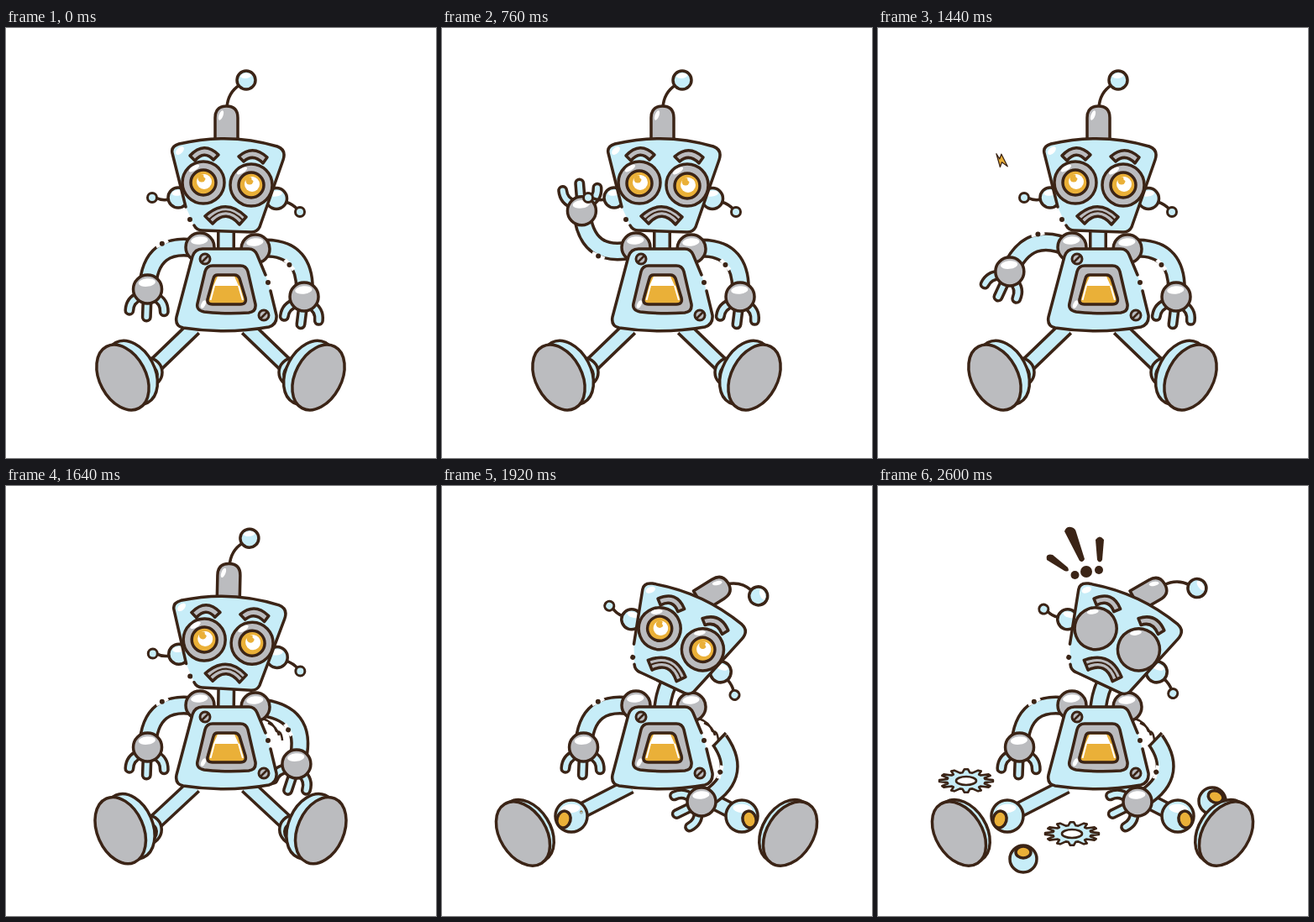
An HTML page that plays this animation: 512x512 px, repeating every 2.88 s.

```html
<!DOCTYPE html>
<html lang="en">
<head>
<meta charset="utf-8">
<title>Robot breakdown</title>
<style>
  html, body { margin: 0; width: 100%; height: 100%; overflow: hidden; background: #fff; }
  svg { display: block; width: 100vw; height: 100vh; }
</style>
</head>
<body>
<svg id="stage" viewBox="0 0 512 512" stroke="#3b2416" stroke-width="3.5" stroke-linejoin="round"></svg>
<script>
const LOOP = 2880, STEP = 40;
const INK = '#3b2416', BLUE = '#c7edf8', GRAY = '#bbbcbf', GOLD = '#eab038', WHITE = '#fff';

// Timing helpers
const clamp = v => Math.min(1, Math.max(0, v));
const lerp = (a, b, u) => a + (b - a) * u;
const ramp = (t, a, b) => clamp((t - a) / (b - a));
const smooth = (t, a, b) => { const u = ramp(t, a, b); return u * u * (3 - 2 * u); };
const track = (t, ...keys) => keys.reduce((v, [time, value], i) =>
  i ? lerp(v, value, smooth(t, keys[i - 1][0], time)) : value, 0);

// Drawing helpers
const path = (d, fill = 'none', more = '') => `<path d="${d}" fill="${fill}" ${more}/>`;
const circle = (x, y, r, fill, more = '') => `<circle cx="${x}" cy="${y}" r="${r}" fill="${fill}" ${more}/>`;
const ellipse = (x, y, rx, ry, fill, turn = 0, more = '') =>
  `<ellipse rx="${rx}" ry="${ry}" fill="${fill}" transform="translate(${x} ${y}) rotate(${turn})" ${more}/>`;
const group = (transform, ...parts) => `<g transform="${transform}">${parts.join('')}</g>`;
const bare = 'stroke="none"';
const dot = (x, y) => circle(x, y, 3, INK, bare);
const glint = (x, y, rx, ry, turn) => ellipse(x, y, rx, ry, WHITE, turn, bare);
const ball = (x, y, r, fill) => circle(x, y, r, fill) + glint(x - r * .04, y - r * .47, r * .6, r * .28, -6);
const tube = (d, w, cap = 'butt') =>
  path(d, 'none', `stroke-width="${w}" stroke-linecap="${cap}"`) +
  path(d, 'none', `stroke="${BLUE}" stroke-width="${w - 7}" stroke-linecap="${cap}"`);

function arm([sx, sy], [cx, cy], [hx, hy], s, side) {
  const r = 1 - s;
  const x = r * r * sx + 2 * r * s * cx + s * s * hx;
  const y = r * r * sy + 2 * r * s * cy + s * s * hy;
  const dx = r * (cx - sx) + s * (hx - cx), dy = r * (cy - sy) + s * (hy - cy);
  const len = Math.hypot(dx, dy) || 1, tx = dx / len, ty = dy / len;
  const ex = x - ty * 10 * side, ey = y + tx * 10 * side;
  return tube(`M${sx} ${sy}Q${cx} ${cy} ${hx} ${hy}`, 23) +
    path(`M${ex - tx * 8} ${ey - ty * 8}L${ex + tx * 8} ${ey + ty * 8}`, 'none', `stroke="${WHITE}" stroke-width="4.5"`) +
    dot(ex, ey);
}

function hand(x, y, turn, dir) {
  const fingers = [-45, 0, 45].map(a =>
    group(`rotate(${dir + a})`, tube(`M12 0Q24 ${a / 9} 33 ${-a / 12}`, 13, 'round')));
  return group(`translate(${x} ${y}) rotate(${turn})`, ...fingers) + ball(x, y, 17, GRAY);
}

function leftArm(t) {
  const angle = track(t, [240, 142], [680, 219], [900, 207], [1130, 219], [1580, 142]);
  const rad = angle * Math.PI / 180, c = Math.cos(rad), s = Math.sin(rad);
  const bend = Math.tanh((173 - angle) / 9);
  const x = 230 + 78 * c, y = 263 + 78 * s;
  const elbow = [230 + 39 * c - s * 46 * bend, 263 + 39 * s + c * 46 * bend];
  return arm([230, 263], elbow, [x, y], .42, bend < 0 ? -1 : 1) + hand(x, y, 0, angle - 50 * bend);
}

function rightArm(t) {
  const fall = ramp(t, 1560, 1740) ** 2;
  const x = lerp(355, 309, fall), y = lerp(320, 376, fall), turn = 57 * fall;
  const wire = fall ? path('M306 277Q318 281 322 292Q328 291 329 303M312 282Q322 286 325 297', 'none', 'stroke-width="2.5"') : '';
  return wire + group(`translate(${x} ${y}) rotate(${turn})`,
    arm([-50, -58], [5, -60], [0, 0], .5, 1), path('M-53 -69L-48 -48')) +
    hand(x, y, turn, 97);
}

function leg(t) {
  const u = ramp(t, 1600, 1880), e = smooth(t, 1600, 1880), hop = Math.sin(Math.PI * u);
  const kx = lerp(169, 154, e), ky = lerp(410, 393, e), r = lerp(17, 19, e);
  return tube(`M224 357L${kx} ${ky}`, 20.5) + ball(kx, ky, r, BLUE) +
    ellipse(kx + lerp(3, -9, e * e), ky + 4, 8, 10, GOLD, 15) +
    group(`translate(${139 - 42.5 * u ** 1.4} ${416 - 2 * u - 13 * hop}) rotate(${-28 - 4 * u + 11 * hop})`,
      ellipse(lerp(12, 6, u * u), 0, 27.5, 40.5, BLUE), ellipse(0, 0, 27.5, 41.5, GRAY));
}

const gear = (() => {
  let d = '';
  for (let i = 0; i < 48; i++) {
    const a = (i - .5) * Math.PI / 24, r = i % 4 < 2 ? 32 : 23;
    d += `${i ? 'L' : 'M'}${r * Math.cos(a)} ${r * .43 * Math.sin(a)}`;
  }
  return path(d + 'Z', BLUE, 'stroke-width="2.6"') + ellipse(0, 0, 12, 5, WHITE, 0, 'stroke-width="2.6"');
})();

const looseBall = (dx, dy, turn) => circle(0, 0, 16, BLUE) + ellipse(dx, dy, 9, 7, GOLD, turn);

function fly(t, x0, y0, x, y, part) {
  const u = smooth(t, 1880, 2080);
  return u ? group(`translate(${lerp(x0, x, u)} ${lerp(y0, y, u) - 28 * Math.sin(Math.PI * u)}) scale(${u})`, part) : '';
}

const screw = (x, y) => circle(x, y, 6, GRAY, 'stroke-width="3"') +
  path(`M${x - 4} ${y + 4}L${x + 4} ${y - 4}`, 'none', 'stroke-width="2.5"');

const torso =
  path('M315 313L322 342Q323 353 313 356Q262 365 211 357Q201 355 203 344L222 272Q225 263 234 263H289Q296 263 299 270L309 294', BLUE, 'stroke-linecap="round"') +
  dot(312, 303) + screw(237, 275) + screw(307, 342) +
  path('M246 283H279Q286 283 288 290L297 329Q298 338 289 339Q262 341 236 338Q226 336 228 328L237 290Q239 283 246 283Z', GRAY) +
  glint(235, 329, 2.5, 5, 25) +
  path('M252 294H272Q276 294 278 298L285 321Q287 329 279 329H246Q238 329 240.5 321L247 298Q248 294 252 294Z', GOLD) +
  path('M252 296H272L277 307H247Z', WHITE, bare) +
  path('M243.5 324L248 307M282 324L277 307', 'none', `stroke="${WHITE}" stroke-width="2"`);

function eye(x, y, size, drift) {
  const iris = size ? group(`translate(${x} ${y + drift}) scale(${size})`,
    circle(0, 0, 15, GOLD), circle(1, -1, 9, WHITE, bare),
    circle(-2, -5, 4.5, GOLD, bare), glint(3, -7, 3, 2, 30)) : '';
  return circle(x, y, 25, GRAY) + glint(x - 11, y - 17, 7, 2.8, -32) + iris;
}

function head(t) {
  const tilt = smooth(t, 1600, 1880);
  const topple = smooth(t, 1680, 1960);
  const swing = track(t, [1640, 0], [2080, 1.05], [2440, -.3], [2600, 0]);
  const iris = 1 - ramp(t, 1900, 2560);
  const drift = track(t, [240, 0], [700, 1], [1320, 0]);
  const slip = tilt * tilt;
  const stem = group(`translate(${4.5 * topple} ${2 * topple}) rotate(${37 * topple} 262 131)`,
    group(`rotate(${24 * swing} 263 95)`, path('M263 95Q264 77 278 68'), ball(286, 62, 11, BLUE)),
    path('M249 133V107Q249 93 262.500 93Q276 93 276 107V133Z', GRAY),
    glint(256, 104, 2.5, 6, 20));
  const leftEar = group(`translate(${-5 * slip} ${-15 * slip})`,
    group(`rotate(${11 * swing} 205 202)`, path('M194 204Q186 206 178 202'), circle(174, 202, 5.5, BLUE, 'stroke-width="3"')),
    ball(205, 202, 12, BLUE));
  const rightEar = group(`rotate(${8 * swing} 322 203)`,
    path('M333 207Q342 210 347 216'), circle(350, 219, 5.5, BLUE, 'stroke-width="3"')) + ball(322, 203, 12.5, BLUE);
  return tube(`M262 268Q${262 + tilt} 250 ${262 + 8 * tilt} 235`, 22) +
    group(`rotate(${23.1 * tilt} 282 236)`, stem, leftEar, rightEar,
      path('M224 235Q227 241 234 241L292 243Q299 243 302 237L330 157Q334 145 323 141Q266 124 206 138Q196 141 198 149L214 213', BLUE, 'stroke-linecap="round"'),
      dot(219, 228), glint(207, 146, 6, 3.5, -45),
      path('M219 152Q236 134 253 151L247 157Q236 145 225 158Z', GRAY),
      path('M277 153Q294 138 311 154L306 161Q294 149 283 159Z', GRAY),
      eye(235, 184, iris, drift), eye(292, 187, iris, drift),
      path('M237 224Q262 201 286 225L278 234Q262 215 246 233Z', GRAY),
      path('M242 228Q262 208 282 229', 'none', 'stroke-width="2"'));
}

function alarm(t) {
  const size = track(t, [1960, 0], [2120, .75], [2280, 1.17], [2440, 1]);
  if (!size) return '';
  return `<g fill="${INK}" stroke="none" transform="translate(250 108) rotate(${8 * (1 - smooth(t, 2120, 2440))}) scale(${size}) translate(-250 -108)">
    <path d="M222 54Q224 48 230 49Q235 50 236 55L246 87Q244 92 240 89Z"/>
    <path d="M201 88Q199 80 208 82L226 97Q229 103 222 101Z"/>
    <path d="M259 64Q264 57 269 64L267 88Q264 93 261 88Z"/>
    <circle cx="248" cy="102" r="7"/><circle cx="234.500" cy="106" r="5"/><circle cx="263" cy="100" r="5"/></g>`;
}

const bolt = (x, y, turn, size) => size ? group(`translate(${x} ${y}) rotate(${turn}) scale(${size})`,
  path('M8 -9L-9 0L-2 1L-6 10L9 -2L2 -3Z', GOLD, 'stroke-width="1.500"')) : '';

function scene(t) {
  return [
    leg(t),
    fly(t, 345, 392, 398, 375, looseBall(4, -5, 20)),
    group('translate(511) scale(-1 1)', leg(t)),
    fly(t, 165, 392, 173, 444, looseBall(0, -8, 0)),
    fly(t, 200, 350, 105, 351, gear),
    fly(t, 240, 355, 231, 414, gear),
    leftArm(t), rightArm(t),
    ball(231, 261, 17, GRAY), ball(297, 263, 17, GRAY),
    head(t), torso,
    bolt(400, 194, 0, track(t, [1000, 0], [1120, 1], [1200, 1.15], [1320, 0])),
    bolt(147, 158, -78, track(t, [1320, 0], [1440, .85], [1560, 0])),
    alarm(t)
  ].join('');
}

const stage = document.getElementById('stage');
let shown = -1;
function play() {
  const t = Math.floor(performance.now() % LOOP / STEP) * STEP;
  if (t !== shown) stage.innerHTML = scene(shown = t);
  requestAnimationFrame(play);
}
play();
</script>
</body>
</html>
```
